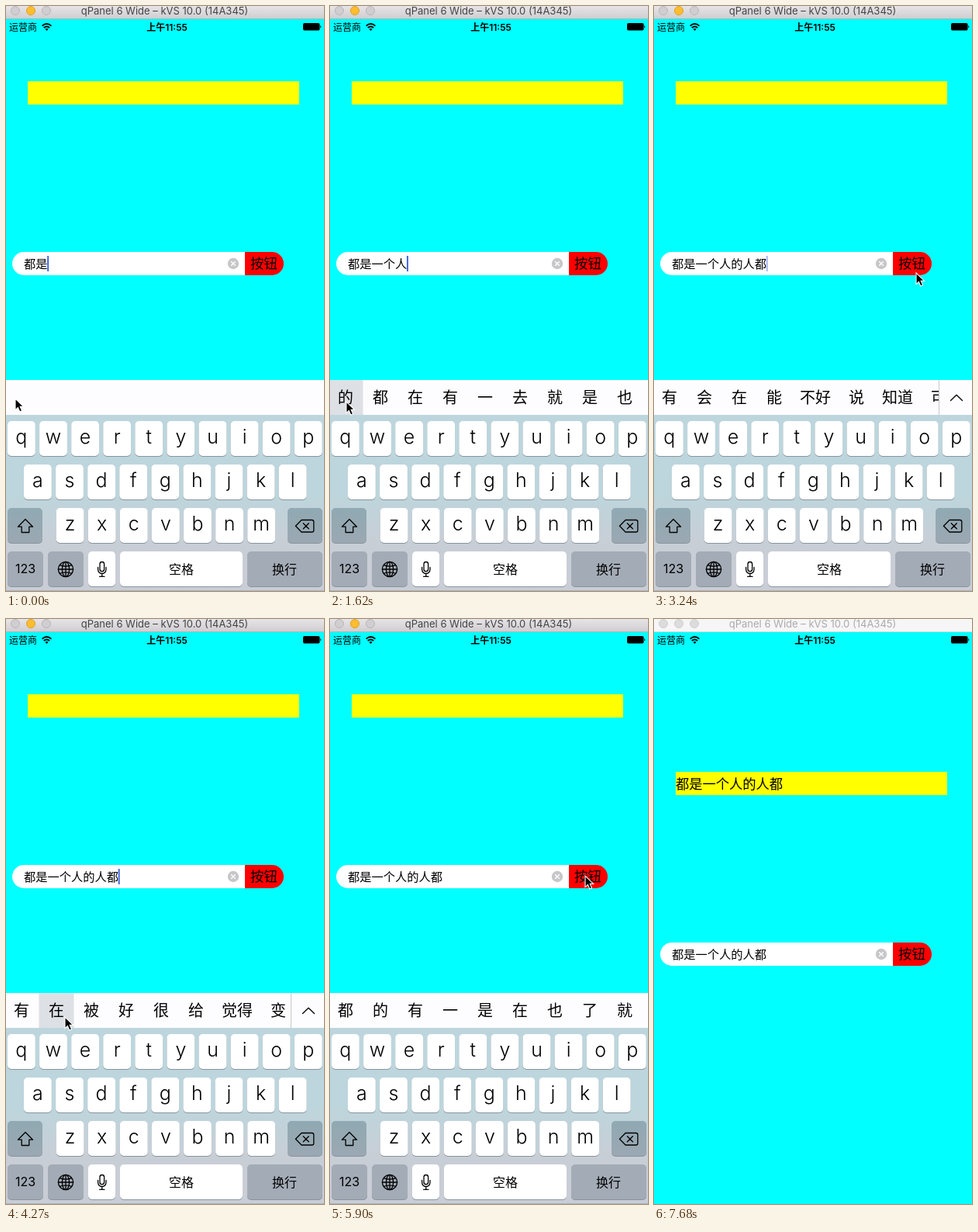
An HTML page for the animation above (7780 ms loop, 410 by 754 pixels).

```html
<!DOCTYPE html>
<html lang="zh-CN">
<head>
<meta charset="utf-8">
<title>Search field demo</title>
<style>
html, body { margin: 0; width: 100%; height: 100%; overflow: hidden; background: #0ff; }
svg { display: block; width: 410px; height: 754px; }
text { font-family: Inter, "Noto Sans CJK SC", "Noto Sans CJK", sans-serif; fill: #000; white-space: pre; }
.han { font-family: "Noto Sans CJK SC", "Noto Sans CJK", sans-serif; }
.mid { text-anchor: middle; }
.letter { font-size: 25px; font-weight: 300; }
.line { fill: none; stroke: #000; stroke-width: 1.3; stroke-linecap: round; stroke-linejoin: round; }
</style>
</head>
<body>
<svg viewBox="0 0 410 754">
  <defs>
    <linearGradient id="bar" x2="0" y2="1"><stop stop-color="#e6e4e6"/><stop offset="1" stop-color="#d0ced0"/></linearGradient>
    <linearGradient id="board" x2="0" y2="1">
      <stop stop-color="#bdd6dd"/><stop offset=".45" stop-color="#bdd5dc"/>
      <stop offset=".72" stop-color="#c8ced6"/><stop offset="1" stop-color="#cacdd5"/>
    </linearGradient>
    <linearGradient id="dark" x2="0" y2="1"><stop stop-color="#90a9b2"/><stop offset="1" stop-color="#9ba8b3"/></linearGradient>
  </defs>
  <rect width="410" height="754" fill="#0ff"/>

  <rect id="titleBar" width="410" height="16"/>
  <rect id="titleEdge" y="16" width="410" height="1"/>
  <g id="lights" stroke-width="1">
    <circle cx="12" cy="6" r="5.5"/><circle cx="32" cy="6" r="5.5"/><circle cx="52" cy="6" r="5.5"/>
  </g>
  <text id="title" class="mid" x="204.5" y="11" font-size="13">qPanel 6 Wide – kVS 10.0 (14A345)</text>

  <text class="han" x="4" y="32" font-size="12">运营商</text>
  <g fill="none" stroke="#000" stroke-width="1.9">
    <path d="M46.6 25.6Q52.5 20.6 58.4 25.6M48.8 28Q52.5 25 56.2 28"/>
    <path d="M50.4 29.8Q52.5 28.2 54.6 29.8L52.5 32Z" fill="#000" stroke="none"/>
  </g>
  <text class="mid" x="207.5" y="32" font-size="12" font-weight="600">上午11:55</text>
  <rect x="383" y="22" width="21.5" height="9.5" rx="1.8"/>
  <path d="M405.3 25Q407.4 26.7 405.3 28.6Z"/>

  <g id="form">
    <rect x="28" y="97" width="350" height="30" fill="#ff0"/>
    <text id="label" class="han" x="28" y="119" font-size="17.25"></text>
    <path d="M308 317H23a15 15 0 0 0 0 30H308Z" fill="#fff"/>
    <path d="M308 317H343a15 15 0 0 1 0 30H308Z" fill="#f00"/>
    <text class="han mid" x="332.5" y="338.3" font-size="17.5">按钮</text>
    <circle cx="293" cy="332" r="7.2" fill="#c7c7c9"/>
    <path d="M290.2 329.2l5.6 5.6m0-5.6l-5.6 5.6" stroke="#fff" stroke-width="1.4"/>
    <text id="typed" class="han" x="23" y="337.6" font-size="15.25"></text>
    <rect id="caret" y="322" width="2" height="20" fill="#4468df"/>
  </g>

  <g id="keyboard">
    <rect y="482" width="410" height="45" fill="#fdfdff"/>
    <g id="words"></g>
    <g id="more">
      <rect x="367" y="482" width="43" height="45" fill="#fdfdff"/>
      <path d="M367.5 482V527" stroke="#c6c9ce"/>
      <path class="line" d="M382.5 508.5L390 501.2L397.5 508.5"/>
    </g>
    <rect y="527" width="410" height="227" fill="url(#board)"/>
    <g id="keys"></g>
    <path class="line" d="M25 661.5L34.6 671.2H29.8V678.5H20.2V671.2H15.4Z"/>
    <path class="line" d="M381 662.5H394.5Q396.8 662.5 396.8 664.8V675.7Q396.8 678 394.5 678H381L373.4 670.2ZM383.3 666.7l7 7m0-7l-7 7"/>
    <g class="line" stroke-width="1.1">
      <circle cx="77" cy="726" r="9.6"/><ellipse cx="77" cy="726" rx="4.6" ry="9.6"/>
      <path d="M77 716.4V735.6M67.4 726H86.6M69.4 720.6Q77 723.6 84.6 720.6M69.4 731.4Q77 728.4 84.6 731.4"/>
      <rect x="121" y="716.5" width="5.6" height="12.2" rx="2.8"/>
      <path d="M118.6 723.5V726Q118.8 731.4 123.8 731.5Q128.8 731.4 129 726V723.5M123.8 731.5V735.3M120.6 735.3H127"/>
    </g>
  </g>
  <rect id="bottomEdge" y="753" width="410" height="1" fill="#a9b4b8"/>
  <path id="mouse" d="M0 0V14.6L3.4 11.5L5.8 17L8.6 15.8L6.2 10.4H10.6Z" stroke="#fff" stroke-width="1.1"/>
</svg>
<script>
const LOOP = 7780, STEP = 147.2, HIDE = 6500, BLUR = 7680;
const SENTENCE = '都是一个人的人都';
const $ = id => document.getElementById(id);

// Suggestion rows
const ROWS = {
  none: '',
  one: '一 不 我 在 有 你 这个 什么',
  unit: '个 下 直 样 定 些 起来 点',
  person: '人 月 小时 好 大 小 字 问题',
  afterPerson: '的 都 在 有 一 去 就 是 也',
  people: '人 时候 是 话 我 事 你 东西',
  all: '都 是 的 在 有 也 就是 会 不',
  can: '有 会 在 能 不好 说 知道 可',
  have: '有 在 被 好 很 给 觉得 变',
  more: '是 在 不 有 会 要 没有 能 好',
  last: '都 的 有 一 是 在 也 了 就'
};

// [tick, typed characters, row, pressed word]
const STATES = [
  [0, 2, 'none'], [1, 2, 'one'], [2, 2, 'one', 0],
  [3, 3, 'none'], [4, 3, 'unit'], [5, 3, 'unit', 0],
  [6, 4, 'none'], [7, 4, 'person', 0],
  [8, 5, 'none'], [9, 5, 'afterPerson'], [11, 5, 'afterPerson', 0],
  [12, 6, 'none'], [14, 6, 'people'], [15, 6, 'people', 0],
  [16, 7, 'none'], [17, 7, 'all', 0],
  [18, 8, 'none'], [19, 8, 'can'], [26, 8, 'can', 1],
  [27, 8, 'none'], [28, 8, 'have'], [29, 8, 'have', 1],
  [30, 8, 'none'], [31, 8, 'more'], [33, 8, 'more', 1],
  [34, 8, 'none'], [35, 8, 'last']
];

// [tick, x, y] of the pointer tip
const PATH = [
  [0, 12, 506], [2, 17, 509], [11, 21, 510], [18, 21, 510], [22, 338, 344],
  [26, 74, 512], [29, 76, 513], [35, 76, 513], [40, 329, 331],
  [44, 340, 331], [49, 413, 280]
];

const key = (x, y, w, fill) =>
  `<rect x="${x}" y="${y + 1}" width="${w}" height="45" rx="5" fill="#87959d"/>` +
  `<rect x="${x}" y="${y}" width="${w}" height="45" rx="5" fill="${fill}"/>`;

const caption = (s, x, y, size) => `<text class="mid" x="${x}" y="${y}" font-size="${size}">${s}</text>`;

function buildKeys() {
  let out = '';
  [['qwertyuiop', 2, 535], ['asdfghjkl', 23, 591], ['zxcvbnm', 64.7, 647]].forEach(([letters, left, y]) => {
    [...letters].forEach((c, i) => {
      const x = left + i * 41.1;
      out += key(x, y, 35.8, '#fff') + `<text class="mid letter" x="${x + 17.9}" y="${y + 29}">${c}</text>`;
    });
  });
  out += key(2, 647, 45, 'url(#dark)') + key(363, 647, 45, 'url(#dark)');
  out += key(2, 703, 46, '#a3abb6') + key(54, 703, 46, '#a3abb6') + key(106, 703, 35, '#fff');
  out += key(147, 703, 158, '#fff') + key(311, 703, 97, '#a3abb6');
  out += caption('123', 25, 731, 16) + caption('空格', 226, 732, 16) + caption('换行', 359, 732, 16);
  $('keys').innerHTML = out;
}

function drawWords(row, pressed) {
  const words = row ? row.split(' ') : [];
  let x = -2.5, out = '';
  words.forEach((word, i) => {
    const w = word.length > 1 ? 61 : 45;
    if (i === pressed) out += `<rect x="${x}" y="482" width="${w}" height="45" fill="#dde0e5"/>`;
    out += `<text class="han mid" x="${x + w / 2}" y="512" font-size="20">${word}</text>`;
    x += w;
  });
  $('words').innerHTML = out;
  show('more', words.some(w => w.length > 1));
}

const show = (id, on) => $(id).setAttribute('display', on ? 'inline' : 'none');
const set = (id, name, value) => $(id).setAttribute(name, value);
const lastBefore = (list, tick) => list.filter(s => s[0] <= tick).pop();

function pointer(tick) {
  const a = lastBefore(PATH, tick), b = PATH[PATH.indexOf(a) + 1] || a;
  const u = b === a ? 0 : (tick - a[0]) / (b[0] - a[0]);
  const e = u * u * (3 - 2 * u);
  return [a[1] + (b[1] - a[1]) * e, a[2] + (b[2] - a[2]) * e];
}

function caretAlpha(tick) {
  const reset = lastBefore(STATES.filter(s => s[3] === undefined), tick)[0];
  const p = (tick - reset) * STEP % 1000;
  if (p < 400) return 1;
  if (p < 480) return (480 - p) / 80;
  return p < 900 ? 0 : (p - 900) / 100;
}

function drawWindow(active) {
  set('titleBar', 'fill', active ? 'url(#bar)' : '#f6f6f6');
  set('titleEdge', 'fill', active ? '#b4b2b4' : '#d8d8d8');
  set('title', 'style', `fill:${active ? '#444' : '#aaa'}`);
  [...$('lights').children].forEach((c, i) => {
    const lit = active && i === 1;
    c.setAttribute('fill', lit ? '#fdbd2f' : active ? '#d0ced0' : '#dcdcdc');
    c.setAttribute('stroke', lit ? '#e0a028' : active ? '#b8b6b8' : '#d0d0d0');
  });
  show('bottomEdge', active);
}

let shown = '';
function render(t) {
  const hidden = t >= HIDE, active = t < BLUR;
  const tick = hidden ? Math.min(49, 44 + Math.floor((t - HIDE) / 146)) : Math.min(40, Math.floor((t + 10) / STEP));
  const id = tick + '/' + hidden + active;
  if (id === shown) return;
  shown = id;

  const [, count, row, pressed] = lastBefore(STATES, tick);
  drawWindow(active);
  drawWords(ROWS[row], pressed);
  show('keyboard', !hidden);
  set('form', 'transform', `translate(0 ${hidden ? 100 : 0})`);
  $('label').textContent = hidden ? SENTENCE : '';
  $('typed').textContent = SENTENCE.slice(0, count);
  set('caret', 'x', 22.7 + count * 15.25);
  set('caret', 'opacity', hidden ? 0 : caretAlpha(tick));
  show('mouse', active);
  set('mouse', 'transform', `translate(${pointer(tick).join(' ')})`);
}

buildKeys();
const start = performance.now();
function loop() {
  render((performance.now() - start) % LOOP);
  requestAnimationFrame(loop);
}
loop();
</script>
</body>
</html>
```
